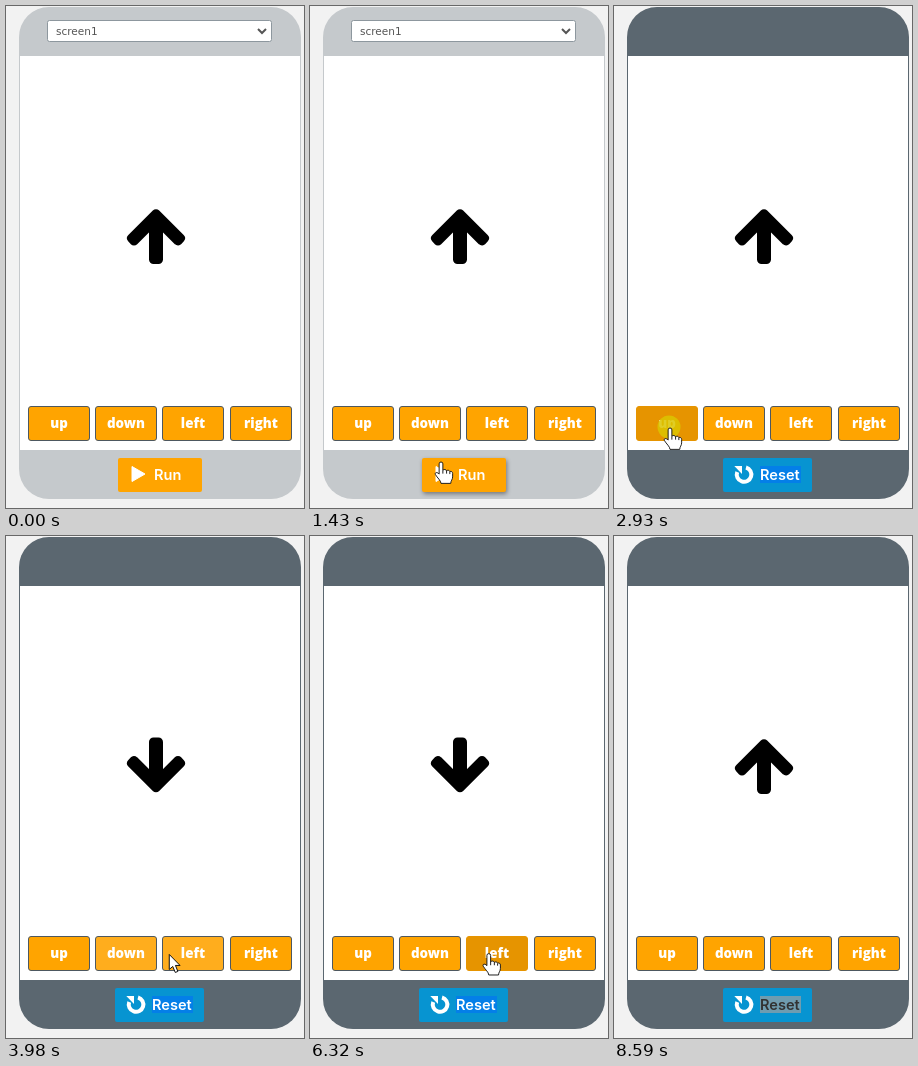
An HTML page that plays this animation: 298 px wide and 502 px high, repeating every 8720 ms.

```html
<!DOCTYPE html>
<html lang="en">
<head>
<meta charset="utf-8">
<title>Arrow app preview</title>
<style>
  html, body { margin: 0; width: 100%; height: 100%; overflow: hidden; background: #f2f2f2; }
  svg { display: block; }
  text { cursor: default; }
  .pick { font: 10.5px "DejaVu Sans", sans-serif; fill: #555; }
  .label { font: 800 13.4px "Open Sans", sans-serif; fill: #fff; text-anchor: middle; }
  .action { font: 600 14.6px Inter, sans-serif; fill: #fff; }
</style>
</head>
<body>
<svg width="298" height="502" viewBox="0 0 298 502">
  <rect id="phone" x="13" y="1" width="282" height="492" rx="30"/>
  <rect x="14" y="50" width="280" height="394" fill="#fff"/>

  <g id="picker">
    <rect x="41.5" y="14.5" width="224" height="21" rx="2" fill="#fff" stroke="#8d979e"/>
    <text class="pick" x="50" y="29">screen1</text>
    <path d="M252 23l4 4 4-4" fill="none" stroke="#555" stroke-width="2"/>
  </g>

  <path id="arrow" d="M0-23.3 24.5 1.2 22 4 2.5-15.5V22.5H-2.5V-15.5L-22 4-24.5 1.2Z"
        stroke="#000" stroke-width="9" stroke-linejoin="round"/>
  <g id="buttons"></g>

  <g id="run">
    <rect x="112" y="452" width="84" height="34" rx="2" fill="#ffa400"/>
    <path d="M126 460.5V475.5L139 468Z" fill="#fff" stroke="#fff" stroke-linejoin="round"/>
    <text class="action" x="148" y="474">Run</text>
  </g>

  <g id="reset">
    <rect x="109" y="452" width="89" height="34" rx="2" fill="#0794d1"/>
    <path d="M132 461.5A7.3 7.3 0 1 1 123.2 466" fill="none" stroke="#fff" stroke-width="4"/>
    <path d="M120.3 460H128V468Z" fill="#fff"/>
    <rect id="mark" x="146" y="460" width="41" height="17"/>
    <text id="resetText" class="action" x="146" y="474">Reset</text>
  </g>

  <circle id="ring" r="11.5" fill="#dbc400" opacity=".85"/>
  <g id="cursor" fill="#fff" stroke="#111" stroke-linejoin="round">
    <g id="hand" transform="scale(.93)">
      <path d="M-2 2a2 2 0 0 1 4 0V9c1-1.5 3.5-1.2 4 .5c1-1 3-.8 3.5.8c1.5-.7 3 .3 3 2V16c0 3-2 4-2 7H0C0 20-4 17-6 13.5C-7 11-4 10.5-2 13Z"/>
      <path d="M2 9v3.5M6 9.5v3M9.5 10.5v2.5" fill="none"/>
    </g>
    <path id="pointer" d="M0 0V15L3.5 12 6 18 8.6 17 6.2 11H10.8Z"/>
  </g>
</svg>
<script>
const LOOP = 8720;
const PRESS = 100, REACT = 100, HOLD = 200; // delays after arriving and pressing
const $ = id => document.getElementById(id);
const show = (id, on) => $(id).setAttribute('display', on ? 'inline' : 'none');
const place = (id, x, y, turn = 0) =>
  $(id).setAttribute('transform', `translate(${x} ${y}) rotate(${turn})`);

const names = ['up', 'down', 'left', 'right'];
const leftOf = i => 22.5 + Math.round(67.2 * i);
$('buttons').innerHTML = names.map((name, i) =>
  `<rect x="${leftOf(i)}" y="400.5" width="61" height="34" rx="2.5"/>
   <text class="label" x="${leftOf(i) + 30.5}" y="422">${name}</text>`).join('');
const faces = [...$('buttons').querySelectorAll('rect')];

const poses = {
  up: [150, 231, 0], down: [150, 228.5, 180],
  left: [151, 232, -90], right: [149, 232, 90]
};

// Where the cursor points for each place it visits
const spots = { off: [242, 512], footer: [131, 456], edge: [142, 487] };
names.forEach((name, i) => {
  spots[name] = [leftOf(i) + 33.5 - 5.5 * i, 422 - 1.1 * i * i];
});

// Arrival times; travel time grows with distance
const tour = [
  [0, 'off'], [860, 'footer'], [1975, 'edge'], [2250, 'footer'],
  [2760, 'up'], [3520, 'down'], [4092, 'left'], [4865, 'right'],
  [5500, 'down'], [6190, 'left'], [6780, 'up'], [7700, 'footer'], [8200, 'off']
].map(([arrive, name], i, all) => {
  const to = spots[name], from = spots[all[Math.max(i - 1, 0)][1]];
  const travel = 200 + 2.2 * Math.hypot(to[0] - from[0], to[1] - from[1]);
  return { name, from, to, travel, start: arrive - travel, press: arrive + PRESS };
});

// The cursor only looks around at both ends of the tour
const presses = tour.slice(3, -2);
const runAt = presses[0].press + REACT;

function cursorAt(t) {
  const { from, to, start, travel } = tour.findLast(leg => leg.start <= t) || tour[0];
  const u = Math.min((t - start) / travel, 1), s = u * u * (3 - 2 * u);
  return from.map((v, k) => v + (to[k] - v) * s);
}

function targetAt(t) {
  const [x, y] = cursorAt(t);
  if (y > 451 && y < 487 && x > 109 && x < 198) return 'footer';
  if (y < 400 || y > 435) return '';
  return names.find((n, i) => x >= leftOf(i) && x <= leftOf(i) + 61) || '';
}

function draw(t) {
  const running = t >= runAt, blurred = t >= 8590;
  $('phone').setAttribute('fill', running ? '#5b6770' : '#c5c9cc');
  show('picker', !running);
  show('run', !running);
  show('reset', running);
  $('mark').setAttribute('fill', blurred ? '#6f9cb0' : '#047fe8');
  $('resetText').style.fill = blurred ? '#323232' : '#fff';

  const hovers = [targetAt(t), targetAt(t - 200)];
  $('run').firstElementChild.style.filter =
    hovers.includes('footer') ? 'drop-shadow(1px 2px 2px rgba(0,0,0,.4))' : 'none';

  const active = presses.find(p => t >= p.press && t < p.press + HOLD);
  faces.forEach((face, i) => {
    const down = active && active.name === names[i];
    const fill = down ? '#e69400' : hovers.includes(names[i]) ? '#ffad1d' : '#ffa400';
    face.setAttribute('fill', fill);
    face.setAttribute('stroke', down ? fill : '#4d5860');
  });

  const last = presses.findLast(p => t >= p.press + REACT);
  place('arrow', ...(last && poses[last.name] || poses.up));

  const [x, y] = cursorAt(t);
  const hand = targetAt(t - 40) !== '';
  show('hand', hand);
  show('pointer', !hand);
  place('cursor', x, y);
  show('ring', active && t >= active.press + HOLD / 4);
  place('ring', x - 1, y - 1);
}

function frame() {
  draw(performance.now() % LOOP);
  requestAnimationFrame(frame);
}
frame();
</script>
</body>
</html>
```
